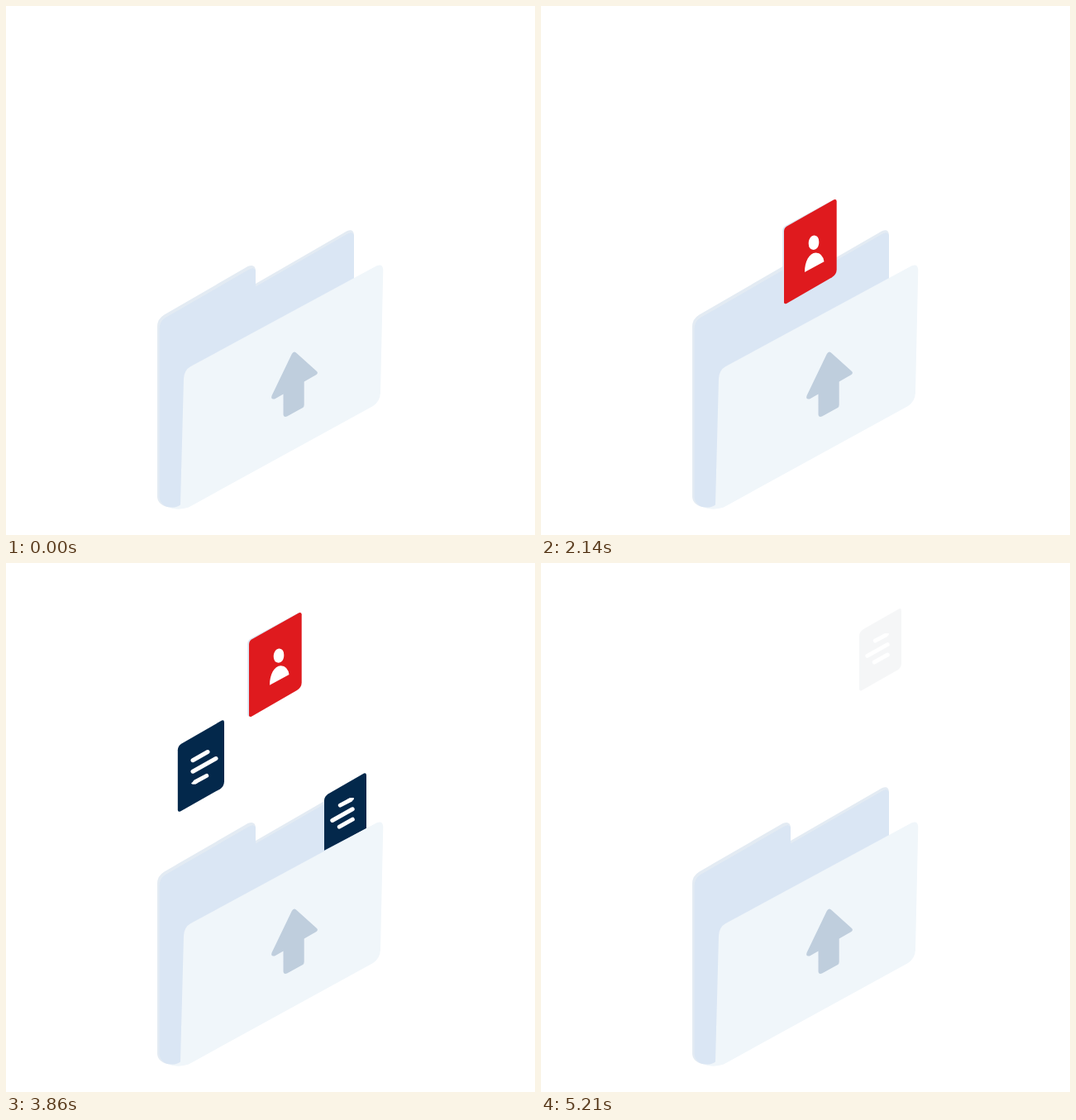
These frames come from a looping animation (640x640 px, 5.57 s). An HTML page:

```html
<!DOCTYPE html>
<html lang="en">
<head>
<meta charset="utf-8">
<title>Folder upload</title>
<style>
  html, body { margin: 0; width: 100%; height: 100%; overflow: hidden; background: #fff; }
  svg { display: block; width: 100vw; height: 100vh; }
  .lines { fill: none; stroke: #fff; stroke-width: 5; stroke-linecap: round; }
</style>
</head>
<body>
<svg viewBox="0 0 640 640">
  <defs>
    <clipPath id="mouth">
      <path d="M0 0H640V214L436 321 357 362.5 294 394.5 264 410 208 441H0Z"/>
    </clipPath>
  </defs>

  <!-- folder back -->
  <path fill="#e3ebf3" d="M183 594V388Q183 378.500 191.500 373.500L293 314.800Q301.500 311.500 302 320V336L412.500 272.300Q420.500 269 421 277V420L212 560V603Q207 607.500 200 607Q184 605 183 594Z"/>
  <path fill="#dae6f4" d="M185.600 594V391Q185.600 381.500 193 377L293.500 319Q300.500 315 302 320V339.500L412.500 276Q419.500 272 421 277V420L212 560V603Q207 607.500 200 607Q186.500 605 185.600 594Z"/>

  <!-- cards: local y = 0 at the top right corner -->
  <g clip-path="url(#mouth)">
    <g id="person">
      <path fill="#dde5f1" d="M292.200 124V38Q292.300 34 296 31.800L354.500 .2 340 60 296 126Q292.400 126.500 292.200 124Z"/>
      <path fill="#df1a1e" d="M294 124.500V38.500Q294 34.500 297.500 32.500L354.500 .4Q357.500 -.8 357.700 2.500V85Q357.500 91 352 94.300L297 126Q294 127 294 124.500Z"/>
      <path fill="#fff" d="M323.700 53.500C323.700 47.500 327 43.600 330.700 43.600Q336.300 44 336.300 51.500C336.300 57.500 333.300 61 329.500 61Q323.900 60.500 323.700 53.500ZM319 88C319 75 324.500 64.800 332.500 64.500Q341 65 342.500 75.300Z"/>
    </g>
    <g id="left">
      <path fill="#03284b" d="M207.800 108.500V36Q208 31 212.500 28.200L261 .4Q264 -.8 264 2.500V74Q263.800 80 259 83.200L211 110.300Q207.800 111.500 207.800 108.500Z"/>
      <path class="lines" d="M226 48.500L244 38.300M226 62L254 46.300M229 74.500L242.700 67.200"/>
      <path fill="#fff" d="M224 76.300L229 72 231.500 76.300Q229 77.800 225 77.400Z"/>
    </g>
    <g id="right">
      <path fill="#03284b" d="M385 97.500V33Q385.200 28 390 25L433 .4Q435.800 -.8 436 2.500V67Q435.800 72 431.500 74.500L388 99.200Q385 100.200 385 97.500Z"/>
      <path class="lines" d="M404.300 39L416.500 32.600M394.800 57.300L419.200 43.600M403.300 65L419.300 56"/>
      <path fill="#fff" d="M413 31.500Q417 29.300 421 30.200 421.500 32 418 34.500Z"/>
    </g>
  </g>

  <!-- folder front -->
  <path fill="#f0f6fa" d="M195 606Q206 608 211 603.500L215 451Q215.500 440.500 223.500 436L449 314Q456 311.500 456.300 319L453 468Q452.500 478.500 444 484L221 606.500Q208 611 195 606Z"/>
  <path fill="#bfcedd" d="M345.800 421Q348 416.800 351 419.500L376 442Q378 444.200 375.500 446L360.700 454.500V482.500Q360.700 485 359 486L340 496.500Q335.800 498 335.500 494V469.500L325 475.400Q320 476.500 321.500 471.500Z"/>
</svg>
<script>
  const LOOP = 5570, FPS = 14, LAST = 73;

  // rise: [start ms, end ms, first y, last y]; fade: [start ms, end ms]
  const cards = [
    { id: 'person', rise: [0, 4920, 381.5, 16], fade: [3916, 4990] },
    { id: 'left', rise: [1540, 5120, 486, 72], fade: [4322, 5094] },
    { id: 'right', rise: [-210, 6110, 852.6, 9], fade: [4530, 5302] }
  ];
  for (const card of cards) card.el = document.getElementById(card.id);

  function ease(t, from, to) {
    const u = Math.min(1, Math.max(0, (t - from) / (to - from)));
    return u * u * (3 - 2 * u);
  }

  function draw(t) {
    for (const { el, rise: [from, to, y0, y1], fade } of cards) {
      const y = y0 + (y1 - y0) * ease(t, from, to);
      el.setAttribute('transform', `translate(0 ${y.toFixed(2)})`);
      el.setAttribute('opacity', (1 - ease(t, ...fade)).toFixed(3));
    }
  }

  const begin = performance.now();
  function tick() {
    const t = (performance.now() - begin) % LOOP;
    // the picture advances in fixed steps and rests on the last one
    const step = Math.min(LAST, Math.floor((t + 5) * FPS / 1000));
    draw(step * 1000 / FPS);
    requestAnimationFrame(tick);
  }
  tick();
</script>
</body>
</html>
```
